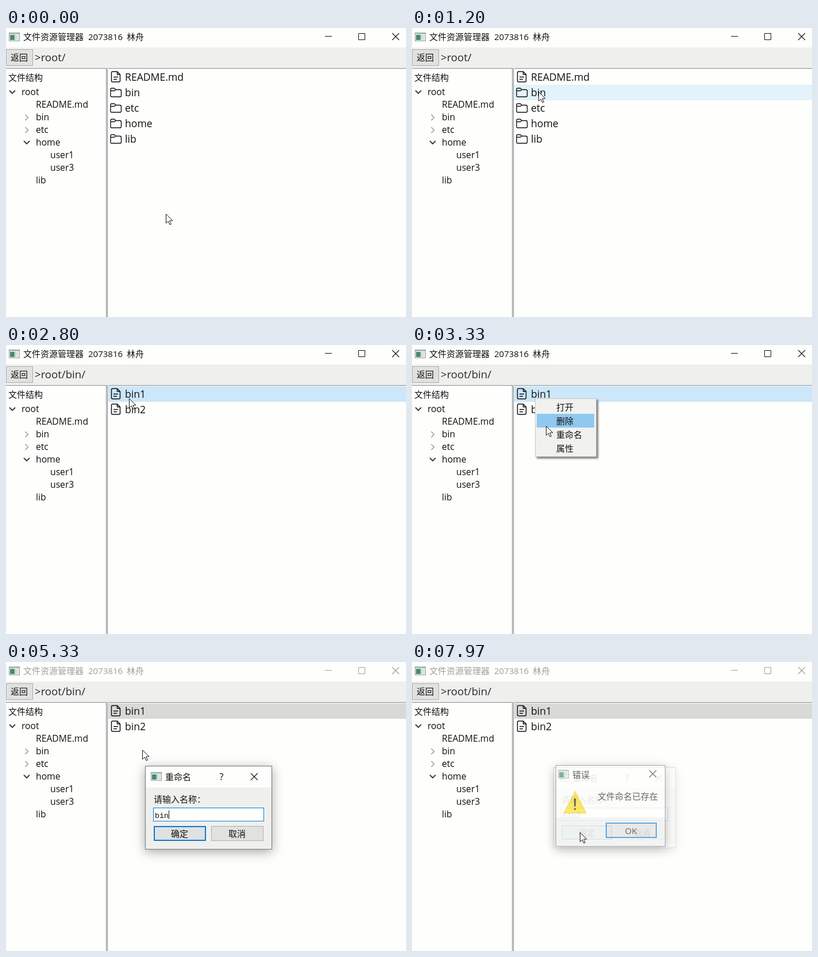
An HTML page with a canvas that plays this animation: 696 px wide and 504 px high, repeating every 8000 ms.

```html
<!DOCTYPE html>
<html lang="zh">
<head>
<meta charset="utf-8">
<title>文件资源管理器</title>
<style>
html, body { margin: 0; width: 100%; height: 100%; overflow: hidden; background: #fefefc; }
canvas { display: block; }
</style>
</head>
<body>
<canvas id="stage" width="696" height="504"></canvas>
<script>
const stage = document.getElementById('stage');
const layer = stage.cloneNode();
let ctx = stage.getContext('2d');
const LOOP = 8000;
const SANS = '"Open Sans", "Noto Sans CJK SC", "Noto Sans CJK", sans-serif';
const MONO = '"Liberation Mono", monospace';
const COLOR = {
  paper: '#fefefc', panel: '#efefee', button: '#e1e1e0', line: '#8a8c90', ink: '#101010',
  faded: '#9f9f9c', hover: '#e3f2fb', selected: '#cce6fa', inactive: '#d9d9d8',
  menuHover: '#90c8f0', blue: '#0a7ad2'
};

// Times of the events, in ms
const OPEN_PRESS = 1570, OPEN_DIR = 1670, RIGHT_PRESS = 2770, MENU_OPEN = 2830,
  MENU_CLOSE = 3800, DIALOG_OPEN = 3840, OK_PRESS = 7770, ERROR_OPEN = 7830;
const KEYS = [[4930, 'b'], [5170, 'bi'], [5330, 'bin'], [6200, 'bin2']];
const CURSOR_PATH = [ // time, x, y
  [230, 278, 324], [430, 252, 232], [630, 231, 149], [800, 226, 124], [1000, 227, 116],
  [1170, 227, 116], [1200, 220, 111], [2100, 220, 111], [2300, 226, 97], [2500, 226, 97],
  [2530, 214, 93], [2950, 214, 93], [3330, 233, 141], [3500, 237, 153],
  [6370, 237, 153], [6580, 267, 232], [6800, 292, 292], [7000, 292, 297]
];

const clamp = v => Math.max(0, Math.min(1, v));
const progress = (t, start, length) => clamp((t - start) / length);
const easeOut = p => 1 - (1 - p) ** 2;

function cursorAt(t) {
  const next = CURSOR_PATH.findIndex(point => point[0] > t);
  if (next < 0) return CURSOR_PATH.at(-1).slice(1);
  if (next === 0) return CURSOR_PATH[0].slice(1);
  const a = CURSOR_PATH[next - 1], b = CURSOR_PATH[next];
  const p = (t - a[0]) / (b[0] - a[0]);
  return [a[1] + (b[1] - a[1]) * p, a[2] + (b[2] - a[2]) * p];
}

function rect(x, y, w, h, fill) {
  ctx.fillStyle = fill;
  ctx.fillRect(x, y, w, h);
}

function box(x, y, w, h, fill, border, width = 1) {
  rect(x, y, w, h, border);
  rect(x + width, y + width, w - 2 * width, h - 2 * width, fill);
}

function text(string, x, y, size = 15, color = COLOR.ink, align = 'left', family = SANS) {
  ctx.font = `${size}px ${family}`;
  ctx.textAlign = align;
  ctx.fillStyle = color;
  ctx.fillText(string, x, y);
}

function stroke(d, x, y, color = COLOR.ink, width = 1, fill) {
  ctx.save();
  ctx.translate(x, y);
  const path = new Path2D(d);
  if (fill) { ctx.fillStyle = fill; ctx.fill(path); }
  ctx.strokeStyle = color;
  ctx.lineWidth = width;
  ctx.lineJoin = 'round';
  ctx.stroke(path);
  ctx.restore();
}

const cross = (x, y, color) => stroke('M0 0L12 12M12 0L0 12', x, y, color, 1.1);

function shadowed(blur, dx, dy, color, draw) {
  ctx.save();
  ctx.shadowBlur = blur;
  ctx.shadowOffsetX = dx;
  ctx.shadowOffsetY = dy;
  ctx.shadowColor = color;
  draw();
  ctx.restore();
}

// Draws on a separate layer, so that the whole group fades as one picture
function faded(alpha, scale, cx, cy, draw) {
  const target = ctx;
  ctx = layer.getContext('2d');
  ctx.clearRect(0, 0, layer.width, layer.height);
  draw();
  ctx = target;
  ctx.save();
  ctx.globalAlpha = alpha;
  ctx.translate(cx, cy);
  ctx.scale(scale, scale);
  ctx.drawImage(layer, -cx, -cy);
  ctx.restore();
}

function appIcon(x, y) {
  box(x, y, 19, 15, '#f4f6f4', '#8a9a98');
  rect(x + 1, y + 1, 17, 2, '#a9c4cc');
  rect(x + 2, y + 4, 8, 9, '#4b8a6a');
  rect(x + 11, y + 4, 2, 9, '#b9d0b8');
  rect(x + 14, y + 4, 3, 9, '#d5e2dc');
}

function fileIcon(x, y) {
  stroke('M3 1H11L16 6V17Q16 19 14 19H3Q1 19 1 17V3Q1 1 3 1ZM11 1V6H16M4.5 10.5H12.5M4.5 14.5H10.5',
    x, y, COLOR.ink, 1.5);
}

function folderIcon(x, y) {
  stroke('M1 3Q1 1 3 1H7.5L10 3.5H17Q19.5 3.5 19.5 6V14Q19.5 16 17.5 16H3Q1 16 1 14ZM1 5.5H7.5L10 3.5',
    x, y, COLOR.ink, 1.4);
}

function drawWindow(active) {
  const color = active ? COLOR.ink : COLOR.faded;
  rect(0, 0, 696, 504, COLOR.paper);
  appIcon(5, 8);
  text('文件资源管理器', 30, 21, 15, color);
  text('2073816', 143, 21, 15, color);
  text('林舟', 210, 21, 15, color);
  rect(555, 14, 12, 1, color);
  stroke('M0 0H11V11H0Z', 613.5, 9.5, color);
  cross(672, 9, color);
}

function drawToolbar(path) {
  rect(0, 34, 696, 36, COLOR.panel);
  box(0, 37, 47, 29, COLOR.button, '#adadac');
  text('返回', 8, 57);
  text(path, 50, 58, 18.6, '#2a2a2a');
  rect(0, 70, 696, 1, COLOR.line);
  rect(174, 70, 4, 434, COLOR.panel);
  rect(174, 70, 1, 434, COLOR.line);
  rect(176, 70, 1, 434, COLOR.line);
}

function drawTree() {
  text('文件结构', 4, 92);
  ['root', 'README.md', 'bin', 'etc', 'home', 'user1', 'user3', 'lib'].forEach((name, i) => {
    const level = i === 0 ? 0 : name.startsWith('user') ? 2 : 1;
    text(name, 27 + 25 * level, 117 + 22 * i, 15.7);
  });
  for (const [x, y] of [[6, 109], [31, 197]]) stroke('M0 0L5 5L10 0', x, y, '#404040', 2);
  for (const y of [151, 173]) stroke('M0 0L5 5L0 10', 33.5, y, '#a0a0a0', 1.7);
}

function drawFiles(names, marks) {
  for (const [row, color] of marks) {
    if (row >= 0 && row < names.length) rect(178, 72 + 27 * row, 518, 27, color);
  }
  names.forEach((name, i) => {
    const y = 72 + 27 * i;
    if (/^README|^bin\d/.test(name)) fileIcon(182.5, y + 3);
    else folderIcon(181, y + 5);
    text(name, 207, y + 20, 17.6);
  });
}

function drawMenu(hovered) {
  shadowed(3, 3, 3, 'rgba(0,0,0,.5)', () => rect(214, 93, 107, 102, COLOR.panel));
  box(214, 93, 107, 102, '#f1f1f0', '#c8c8c8');
  ['打开', '删除', '重命名', '属性'].forEach((label, i) => {
    if (i === hovered) rect(217, 96 + 24 * i, 100, 24, COLOR.menuHover);
    text(label, 251, 114 + 24 * i);
  });
}

function drawFrame(x, y, w, h) {
  shadowed(18, 0, 4, 'rgba(0,0,0,.35)', () => rect(x, y, w, h, COLOR.panel));
  box(x, y, w, h, COLOR.panel, '#74767a');
}

function drawRename(value, caret, okFill) {
  drawFrame(242, 181, 221, 146);
  rect(243, 182, 219, 37, COLOR.paper);
  appIcon(252, 192);
  text('重命名', 277, 206);
  text('?', 375, 206, 16, COLOR.ink, 'center');
  cross(426, 194, COLOR.ink);
  text('请输入名称：', 257, 245);
  box(256, 254, 193, 24, COLOR.paper, COLOR.blue);
  text(value, 259, 272, 13.33, COLOR.ink, 'left', MONO);
  if (caret) rect(259 + 8 * value.length, 259, 1, 15, COLOR.ink);
  box(257, 286, 91, 26, okFill, COLOR.blue, 2);
  box(357, 286, 91, 26, COLOR.button, '#b0b0b0');
  text('确定', 302, 305, 15, COLOR.ink, 'center');
  text('取消', 402, 305, 15, COLOR.ink, 'center');
}

function drawError() {
  drawFrame(250, 180, 191, 142);
  rect(251, 181, 189, 90, COLOR.paper);
  appIcon(254, 188);
  text('错误', 279, 202);
  cross(413, 189, COLOR.ink);
  stroke('M20 0L39 38H0Z', 264, 225.5, '#e5c010', 1, '#fbdc10');
  rect(282, 238, 3, 14, '#202020');
  rect(282, 255, 3, 3, '#202020');
  text('文件命名已存在', 323, 240);
  box(337, 280, 89, 27, COLOR.button, COLOR.blue, 2);
  text('OK', 381, 300, 15, COLOR.ink, 'center');
}

function drawCursor(x, y) {
  stroke('M.5 .5V16.5L4.3 13L7 19L9.4 18L6.8 12H12Z', Math.round(x), Math.round(y), '#181818', 1, '#fff');
}

function render(t) {
  const [x, y] = cursorAt(t);
  const inBin = t >= OPEN_DIR, dialog = t >= DIALOG_OPEN;
  const marks = [];
  if (t < RIGHT_PRESS) {
    const pressed = t >= OPEN_PRESS && !inBin;
    if (!inBin || t >= 1730) marks.push([Math.floor((y - 72) / 27), pressed ? COLOR.selected : COLOR.hover]);
  } else {
    marks.push([0, dialog ? COLOR.inactive : COLOR.selected]);
  }

  drawWindow(!dialog);
  drawToolbar(inBin ? '>root/bin/' : '>root/');
  drawTree();
  drawFiles(inBin ? ['bin1', 'bin2'] : ['README.md', 'bin', 'etc', 'home', 'lib'], marks);

  if (t >= MENU_OPEN && t < MENU_CLOSE) {
    faded(progress(t, MENU_OPEN - 30, 150), 1, 0, 0, () => drawMenu(Math.floor((y - 96) / 24)));
  }

  if (dialog) {
    const lastKey = KEYS.filter(key => key[0] <= t).at(-1) || [DIALOG_OPEN, ''];
    const caret = Math.floor((t - lastKey[0]) / (lastKey[1] === 'bin' ? 600 : 535)) % 2 === 0;
    const opening = easeOut(progress(t, DIALOG_OPEN, 260));
    const closing = progress(t, ERROR_OPEN, 140);
    const okFill = t >= OK_PRESS ? '#cce4f7' : y >= 286 ? '#e5f1fb' : COLOR.button;
    faded(opening * (1 - .75 * closing), .9 + .1 * opening - .035 * closing, 352.5, 254,
      () => drawRename(lastKey[1], caret, okFill));
    if (closing > 0) faded(.62 * closing, .95 + .05 * closing, 345.5, 251, drawError);
  }
  drawCursor(x, y);
}

function tick() {
  render(performance.now() % LOOP);
  requestAnimationFrame(tick);
}
tick();
</script>
</body>
</html>
```
